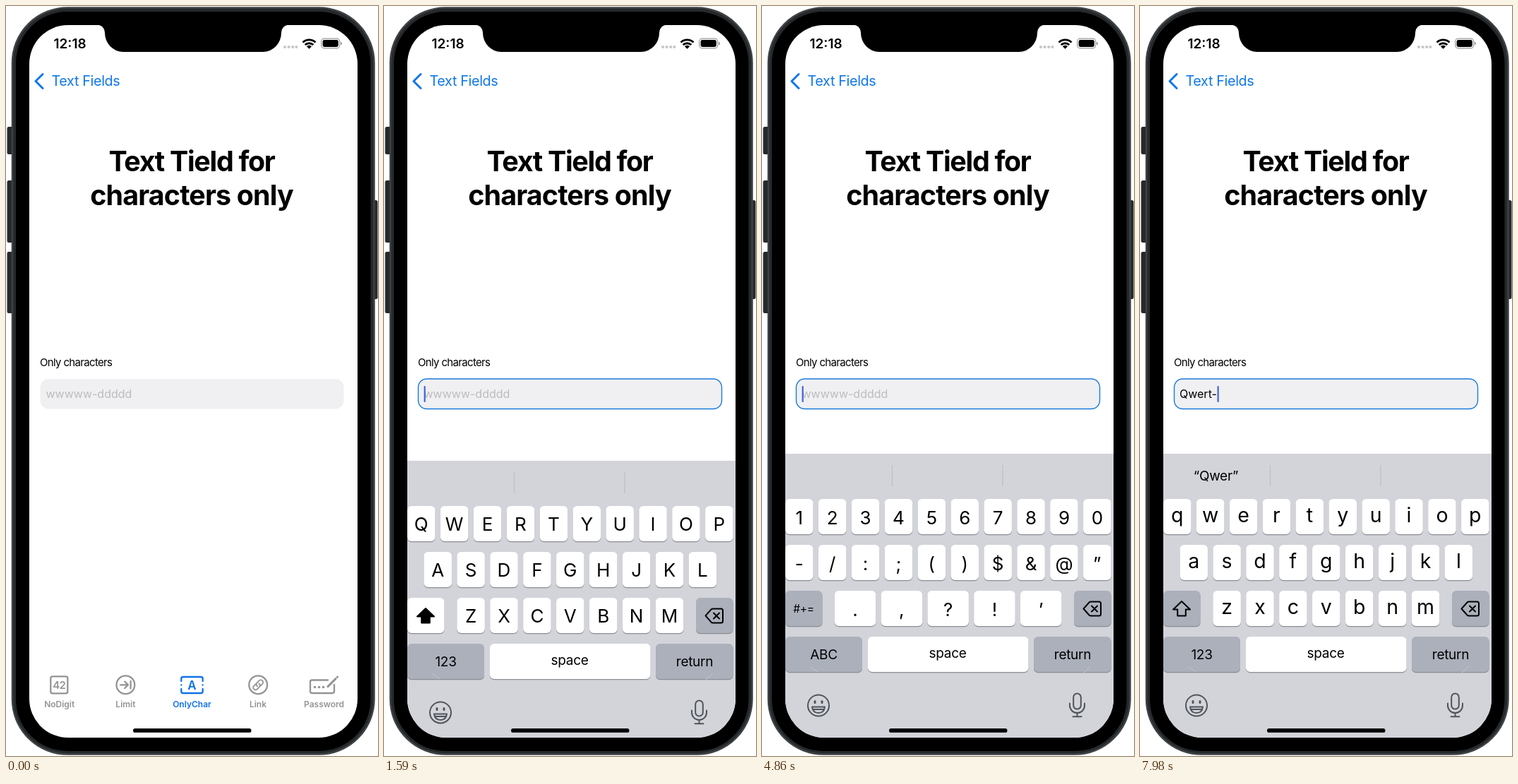
An HTML page that plays this animation: 527 px wide and 1062 px high, repeating every 8000 ms.

```html
<!DOCTYPE html>
<html lang="en">
<head>
<meta charset="utf-8">
<title>Text field demo</title>
<style>
html, body { margin: 0; width: 100%; height: 100%; overflow: hidden; background: #fff; }
svg { display: block; width: 527px; height: 1062px; font-family: Inter, "Liberation Sans", sans-serif; font-optical-sizing: none; }
.mid { text-anchor: middle; }
.title { font-size: 39.4px; font-weight: 700; letter-spacing: -.033em; }
.title + .title { letter-spacing: -.022em; }
.field { font-size: 16px; }
.tab { font-size: 12px; font-weight: 600; text-anchor: middle; stroke: none; }
.line { fill: none; stroke-width: 2.3; stroke-linecap: round; stroke-linejoin: round; }
.key { fill: #fff; }
.special { fill: #abb0bb; }
.word { font-size: 19px; letter-spacing: -.015em; text-anchor: middle; }
.upper { font-size: 26px; }
.lower { font-size: 28.5px; }
.num { font-size: 26px; }
</style>
</head>
<body>
<svg viewBox="0 0 527 1062">
  <defs>
    <clipPath id="screen"><rect x="33" y="27" width="465" height="1009" rx="55"/></clipPath>
    <filter id="lift" x="-20%" y="-20%" width="140%" height="140%">
      <feDropShadow dx="0" dy="1" stdDeviation="1.6" flood-opacity=".3"/>
    </filter>
  </defs>

  <!-- phone body -->
  <g fill="#26292b">
    <rect x="1.5" y="171" width="10" height="39" rx="2.5"/>
    <rect x="1.5" y="247" width="10" height="88" rx="2.5"/>
    <rect x="1.5" y="348" width="10" height="87" rx="2.5"/>
    <rect x="517" y="275" width="9.5" height="140" rx="2.5"/>
  </g>
  <rect x="9" y="2.5" width="512.5" height="1057" rx="78" fill="#26292b" stroke="#3f4244" stroke-width="2.5"/>
  <rect x="14" y="8" width="502.5" height="1047" rx="73"/>
  <rect x="33" y="27" width="465" height="1009" rx="55" fill="#fff"/>

  <!-- status bar -->
  <text x="67.5" y="60" font-size="19" font-weight="600">12:18</text>
  <g fill="#c6c6c8">
    <circle cx="395" cy="58" r="2.1"/><circle cx="400.6" cy="58" r="2.1"/>
    <circle cx="406.2" cy="58" r="2.1"/><circle cx="411.4" cy="58" r="2.1"/>
  </g>
  <path d="M420.5 51.5a13 13 0 0 1 18 0M423.7 55a8.4 8.4 0 0 1 11.6 0" fill="none" stroke="#000" stroke-width="2.9"/>
  <path d="M426 57.3a5 5 0 0 1 7 0L429.5 60.8z"/>
  <rect x="446.7" y="46.2" width="26" height="13.6" rx="4" fill="none" stroke="#999" stroke-width="1.2"/>
  <rect x="448.6" y="48.1" width="22.2" height="9.8" rx="2.4"/>
  <path d="M474 50.8q2 .4 2 2.2t-2 2.2z" fill="#999"/>

  <!-- page -->
  <path class="line" style="stroke-width:3" d="M52 96.5L42 106.5L52 116.5" stroke="#0f77e9"/>
  <text x="64.5" y="113.4" font-size="19.8" letter-spacing="-.36" fill="#0f77e9">Text Fields</text>
  <text class="title mid" x="263" y="233.5">Text Tield for</text>
  <text class="title mid" x="263" y="282">characters only</text>
  <text x="48" y="510.3" font-size="15" letter-spacing="-.66">Only characters</text>
  <rect id="box" x="48.5" y="528" width="430" height="42.5" rx="12" fill="#f0f0f2" stroke-width="1.4"/>
  <text id="hint" class="field" x="56.5" y="555" fill="#bcbcc0">wwwww-ddddd</text>
  <text id="value" class="field" x="56" y="555"></text>
  <rect id="caret" y="538" width="2.2" height="23" rx="1" fill="#4066d6"/>

  <!-- tab bar -->
  <g stroke="#949496" fill="#949496">
    <rect class="line" x="63.3" y="949.3" width="24" height="24" rx="2.5"/>
    <text class="tab" x="75.3" y="967" style="font-size:15px;letter-spacing:-.04em">42</text>
    <text class="tab" x="75.7" y="993">NoDigit</text>
    <circle class="line" cx="169.4" cy="961.3" r="12.9"/>
    <path class="line" d="M162 961.3H172.6M168.3 956.6L173 961.3L168.3 966M176.6 956V966.6"/>
    <text class="tab" x="169.4" y="993">Limit</text>
    <circle class="line" cx="357.2" cy="961.3" r="12.9"/>
    <g transform="rotate(-45 357.2 961.3)">
      <path class="line" style="stroke-width:1.8" d="M356 958H352a3.3 3.3 0 0 0 0 6.6H356.5a3.3 3.3 0 0 0 3 -4M358.4 964.6H362.4a3.3 3.3 0 0 0 0 -6.6H358a3.3 3.3 0 0 0 -3 4"/>
    </g>
    <text class="tab" x="357" y="993">Link</text>
    <path class="line" d="M456 954.5H433.5Q431 954.5 431 957V970.6Q431 973 433.5 973H462.5Q465 973 465 970.6V961"/>
    <path class="line" style="stroke-width:3" d="M456 963.6L467 952.6M469.3 950.3L469.6 950"/>
    <g stroke="none"><circle cx="437.5" cy="964.5" r="1.8"/><circle cx="443.5" cy="964.5" r="1.8"/><circle cx="449.5" cy="964.5" r="1.8"/></g>
    <text class="tab" x="450.5" y="993">Password</text>
  </g>
  <g stroke="#0f72ea" fill="#0f72ea">
    <path class="line" d="M248.3 956V952.5Q248.3 950 250.8 950H276.2Q278.7 950 278.7 952.5V956M248.3 967V970.5Q248.3 973 250.8 973H276.2Q278.7 973 278.7 970.5V967M248.3 961.5h.1M278.6 961.5h.1"/>
    <text class="tab" x="263.5" y="967.6" style="font-size:17px">A</text>
    <text class="tab" x="263.5" y="993">OnlyChar</text>
  </g>

  <!-- keyboard -->
  <g clip-path="url(#screen)">
    <g id="board">
      <rect x="33" y="634" width="465" height="410" fill="#d2d4da"/>
      <path d="M184.5 650V680M341 650V680" stroke="#bcbfc6" stroke-width="1.2"/>
      <text id="guess" class="word" x="107.5" y="672"></text>
      <g id="planes"></g>
      <g id="common"></g>
      <g fill="none" stroke="#50545b" stroke-width="2" stroke-linecap="round" stroke-linejoin="round">
        <circle cx="80" cy="990.5" r="15"/>
        <path d="M71 992.5H89Q88 1001 80 1001T71 992.500zM73 996H87"/>
        <path d="M75 984.5v2M85 984.5v2" stroke-width="3"/>
        <rect x="441.2" y="973.5" width="10.6" height="22" rx="5.3"/>
        <path d="M436 987.5V990.5a10.5 10.5 0 0 0 21 0V987.5M446.5 1001V1006M440.5 1006.3H452.5"/>
      </g>
      <path d="M69 936L79 943M456 944L466 935" stroke="#c3c7ce" stroke-width="1"/>
      <g id="popup" filter="url(#lift)">
        <path class="key"/>
        <text class="mid" y="670" font-size="41" font-weight="300"></text>
      </g>
    </g>
  </g>

  <!-- notch and home indicator -->
  <path d="M127 26q12.500 1 13 12a26 27 0 0 0 26 27H364a26 27 0 0 0 26 -27q.5 -11 13 -12z"/>
  <rect x="180" y="1023" width="167.500" height="5.800" rx="2.900"/>
</svg>
<script>
const $ = id => document.getElementById(id);
const LOOP = 8000, STEP = 30, PITCH = 46.9, KEY = 39.5, LEFT = 33;
const rowY = [698, 763, 828, 893];

const layouts = {
  upper: ['QWERTYUIOP', 'ASDFGHJKL', 'ZXCVBNM'],
  lower: ['qwertyuiop', 'asdfghjkl', 'zxcvbnm'],
  num: ['1234567890', '-/:;()$&@”', '.,?!’']
};
const baseline = { upper: 35, lower: 33, num: 35.7 };

const cap = (x, y, w, type = 'key') =>
  `<rect x="${x}" y="${y + 1.3}" width="${w}" height="50" rx="6" fill="#8b8d93"/>` +
  `<rect class="${type}" x="${x}" y="${y}" width="${w}" height="50" rx="6"/>`;
const word = (x, y, s, size = 19) => `<text class="word" x="${x}" y="${y}" style="font-size:${size}px">${s}</text>`;

function row(chars, r, name) {
  const wide = chars.length === 5;
  const pitch = wide ? 65.8 : PITCH, w = wide ? 58.5 : KEY;
  const x0 = wide ? 102.8 : LEFT + (10 - chars.length) * PITCH / 2;
  return [...chars].map((c, i) => {
    const x = x0 + i * pitch;
    const glyph = c === '&' ? '&amp;' : c;
    return cap(x, rowY[r], w) +
      `<text class="mid ${name}" x="${x + w / 2}" y="${rowY[r] + baseline[name]}">${glyph}</text>`;
  }).join('');
}

const arrow = fill => `<path d="M59 843L71 854.5H64.8V863.5H53.2V854.5H47Z" fill="${fill}"
  stroke="#000" stroke-width="2" stroke-linejoin="round"/>`;

const planes = {};
for (const name in layouts) {
  const g = document.createElementNS('http://www.w3.org/2000/svg', 'g');
  const isNum = name === 'num', isUpper = name === 'upper';
  g.innerHTML = layouts[name].map((chars, r) => row(chars, r, name)).join('') +
    cap(LEFT, rowY[2], 52.5, isUpper ? 'key' : 'special') +
    (isNum ? word(59, 859, '#+=', 15.5) : arrow(isUpper ? '#000' : 'none')) +
    cap(LEFT, rowY[3], 109, 'special') + word(87.5, 925, isNum ? 'ABC' : '123');
  planes[name] = $('planes').appendChild(g);
}

$('common').innerHTML =
  cap(442, rowY[2], 52.5, 'special') + cap(150, rowY[3], 227.5) + cap(385, rowY[3], 109.5, 'special') +
  word(263, 923, 'space') + word(440, 925, 'return') +
  `<path d="M455.5 853.5L463.5 844.5Q464.5 843.5 466 843.5H477.5Q480 843.5 480 846V861Q480 863.5 477.5 863.5H466Q464.5 863.5 463.5 862.5ZM467 849.5L475 857.5M475 849.5L467 857.5"
    fill="none" stroke="#000" stroke-width="2" stroke-linejoin="round" stroke-linecap="round"/>`;

// key, press time, field text afterwards
const taps = [
  ['1', 2760, ''], ['1', 3180, ''], ['1', 3660, ''], ['1', 4140, ''],
  ['Q', 5910, 'Q'], ['w', 6420, 'Qw'], ['e', 6870, 'Qwe'], ['r', 7320, 'Qwer'], ['t', 7770, 'Qwert-']
];
const blinks = [[1680, 1890], [2040, 2310], [2940, 3150], [4350, 4680], [5130, 5400]];
const GUESS_LAG = 360;

const hold = c => c === '1' ? 30 : 60;
const clamp = v => Math.max(0, Math.min(1, v));
const show = (el, on) => { el.style.display = on ? '' : 'none'; };

function drawPopup(c, name) {
  const i = layouts[name][0].indexOf(c);
  const a = LEFT + i * PITCH, b = a + KEY;
  const l = Math.max(LEFT, a - 16), r = i ? b + 16 : 103.5;
  const neck = i ? `V713Q${a} 706 ${a - 5} 701L${l + 4} 688Q${l} 684 ${l} 678` : '';
  const [shape, label] = $('popup').children;
  shape.setAttribute('d', `M${l} 630Q${l} 620 ${l + 10} 620H${r - 10}Q${r} 620 ${r} 630V677
    Q${r} 682 ${r - 5} 687L${b + 5} 702Q${b} 707 ${b} 714V742Q${b} 748 ${b - 6} 748
    H${a + 6}Q${a} 748 ${a} 742${neck}Z`);
  label.setAttribute('x', (l + r) / 2);
  label.textContent = c;
}

function drawGuess(t) {
  const last = taps.filter(([, at, value]) => value && t >= at + GUESS_LAG).pop();
  if (!last) { $('guess').textContent = ''; return; }
  const [, at, text] = last;
  // the closing quote briefly keeps its old place
  const shift = text.length > 1 && t < at + GUESS_LAG + 60 ? -9 : 0;
  $('guess').innerHTML = `“${text}<tspan dx="${shift}">”</tspan>`;
}

function render(t) {
  const focused = t >= 1200;
  $('box').setAttribute('stroke', focused ? '#1a7bdc' : 'none');

  // critically damped spring
  const x = Math.max(0, t - 1284) * .01826;
  const rest = t >= 1890 ? 0 : (1 + x) * Math.exp(-x);
  $('board').setAttribute('transform', `translate(0 ${403 * rest})`);

  const name = t < 2070 ? 'upper' : t < 5100 ? 'num' : t < 5970 ? 'upper' : 'lower';
  for (const key in planes) show(planes[key], key === name);

  const tap = taps.find(([c, at]) => t >= at && t < at + hold(c));
  show($('popup'), tap);
  if (tap) drawPopup(tap[0], name);

  const typed = taps.filter(([c, at]) => t >= at + hold(c)).pop();
  const value = typed ? typed[2] : '';
  $('value').textContent = value;
  show($('hint'), !value);

  const width = value ? $('value').getComputedTextLength() : 0;
  const fade = Math.max(...blinks.map(([a, b]) => clamp(Math.min(t - a, b - t) / 90)));
  $('caret').setAttribute('x', 56.6 + width);
  $('caret').setAttribute('opacity', focused ? 1 - fade : 0);

  drawGuess(t);
}

function tick() {
  const t = performance.now() % LOOP;
  render(t - t % STEP);
  requestAnimationFrame(tick);
}
tick();
</script>
</body>
</html>
```
